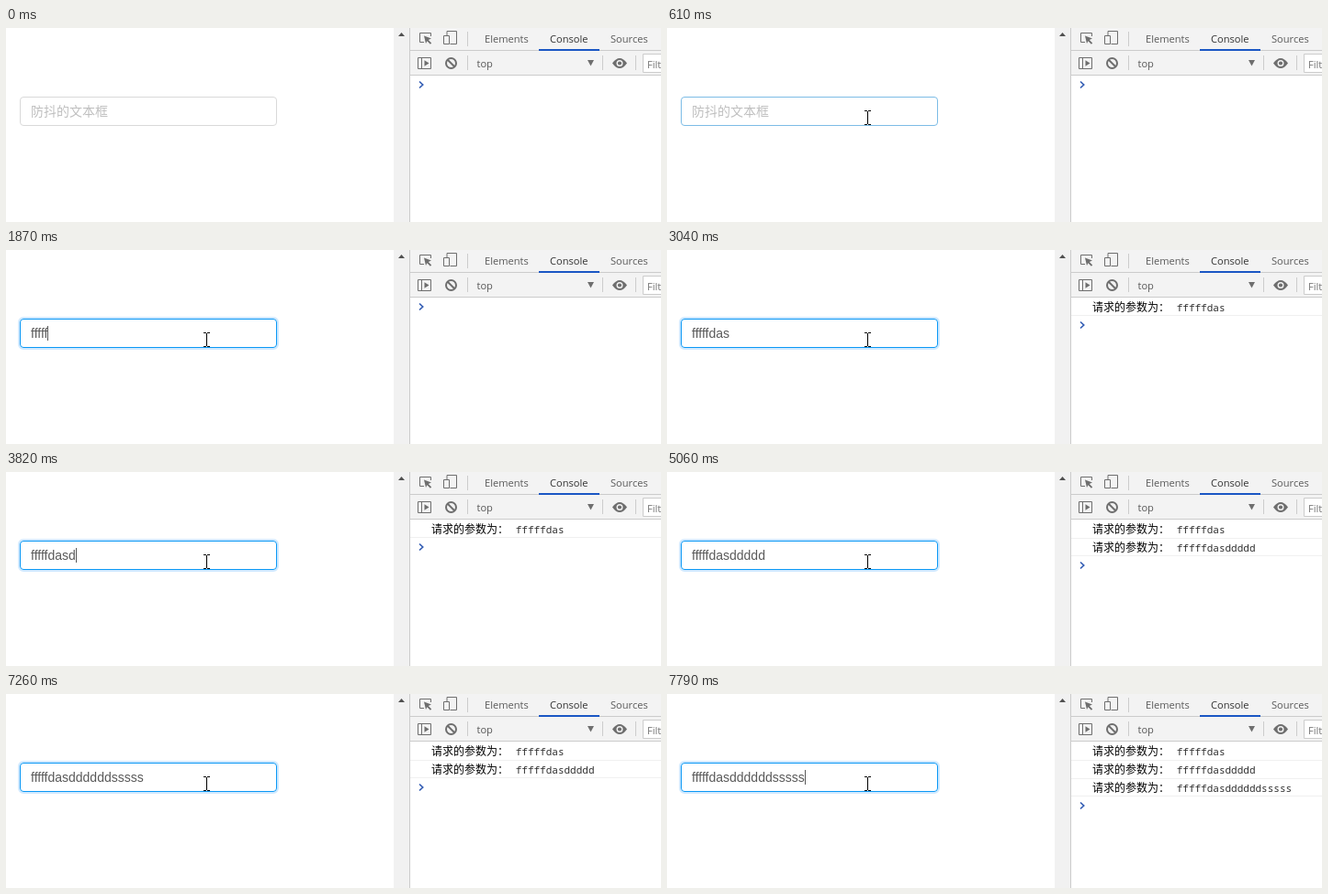
These frames come from a looping animation (713 px wide and 212 px high, 8 s). An HTML page:

```html
<!DOCTYPE html>
<html lang="zh-CN">
<head>
<meta charset="utf-8">
<style>
  html, body { margin: 0; width: 100%; height: 100%; overflow: hidden; background: #fff; }
  svg { display: block; }
  .tab { font: 11.1px "Open Sans", sans-serif; fill: #5a5a5a; }
  .tab .active { fill: #333; }
  .tab .faint { fill: #757575; }
  .cjk { font-family: "Noto Sans CJK SC", "Noto Sans CJK", sans-serif; }
  .mono { font: 11px "Noto Sans Mono", monospace; fill: #303030; }
  #typed { font: 14px "Liberation Sans", Arial, sans-serif; font-variant-ligatures: none; fill: #595959; }
  .icon { fill: none; stroke: #6e6e6e; }
  .solid { fill: #6e6e6e; }
</style>
</head>
<body>
<svg width="713" height="212" viewBox="0 0 713 212">
  <!-- page scrollbar -->
  <path d="M422 0h17v212h-17z" fill="#f1f1f1"/>
  <path d="M427 9l3.5-4 3.5 4z" fill="#505050"/>

  <!-- developer tools -->
  <path d="M440 0h273v52H440z" fill="#f3f3f3"/>
  <path d="M439.5 0V212M440 24.5H713M440 51.5H713M502.5 4V20M502.5 30V46M649.5 30V46M685.5 30V46"
        fill="none" stroke="#ccc"/>
  <path d="M580 23h66v2h-66z" fill="#1a56c4"/>
  <g class="icon">
    <path d="M455 15.5H450.5V5.5H462.5V9"/>
    <path d="M480 8V3.5H490.5V17.5H483.5M476.5 8.5H482.5V17.5H476.5z"/>
    <path d="M448.5 32.5H462.5V44.5H448.5zM452.5 32.5V44.5"/>
    <g stroke-width="2"><circle cx="484.5" cy="38.5" r="5.5"/><path d="M480.5 34.5l8 8"/></g>
  </g>
  <g class="solid">
    <path d="M455 8.5l8 3-3.2 1.4 3.4 3.6-1.3 1.2-3.5-3.5-1.4 2.8z"/>
    <path d="M455.5 35.2l5 3.3-5 3.3z"/>
    <path d="M633 35h7l-3.5 6.5z"/>
    <path d="M660 38.5q8-11 16 0q-8 11-16 0z"/>
  </g>
  <circle cx="668" cy="38.5" r="2.8" fill="#6e6e6e" stroke="#f3f3f3" stroke-width="1.4"/>
  <path d="M693.5 28.5H720V48.5H693.5z" fill="#fff" stroke="#ccc"/>
  <g class="tab">
    <text x="521" y="16">Elements</text>
    <text x="592" y="16" class="active">Console</text>
    <text x="658" y="16">Sources</text>
    <text x="512.5" y="43">top</text>
    <text x="698" y="44" class="faint">Filter</text>
  </g>
  <g id="logs"></g>
  <path id="lastLine" d="M440 51.5H713" stroke="#f0f0f0"/>
  <path id="prompt" d="M450 58.5l3.7 3.5-3.7 3.5" fill="none" stroke="#365fb5" stroke-width="1.7"/>

  <!-- text field -->
  <rect id="glow" x="14" y="74" width="282" height="34" rx="5" fill="none" stroke="#1890ff" stroke-width="2"/>
  <rect id="field" x="15.5" y="75.5" width="279" height="31" rx="3.5" fill="#fff"/>
  <text id="hint" class="cjk" x="27" y="96" font-size="14" fill="#bfbfbf">防抖的文本框</text>
  <text id="typed" x="27" y="96"></text>
  <rect id="caret" y="83" width="1" height="16" fill="#595959"/>

  <!-- pointer shapes, hot spot at 0,0 -->
  <path id="arrow" d="M0 0V16l3.7-3.5 2.5 5.8 2.4-1-2.5-5.7h5.2z" fill="#fff" stroke="#000"/>
  <path id="beam" d="M-3 -7.5H0M1 -7.5H4M.5 -7V7M-3 7.5H0M1 7.5H4" fill="none" stroke="#000"/>
</svg>
<script>
const LOOP = 8000;
const TEXT = "fffffdasddddddsssss";
const KEYS = [1150, 1330, 1510, 1690, 1870, 2170, 2490, 2490, 3820, 4050,
  4200, 4350, 4510, 5790, 5960, 6130, 6310, 6550, 6700];
const LOGS = [3040, 5060, 7330];
const CARET_OFF = [[3040, 3590], [5060, 5610], [7260, 7790]];
// quadratic curve of the pointer: start, control, end
const PATH = [[514, 200], [204, 205], [218, 98]];

const $ = id => document.getElementById(id);
const show = (id, on) => $(id).setAttribute("visibility", on ? "visible" : "hidden");
const shift = (id, x, y) => $(id).setAttribute("transform", `translate(${x} ${y})`);
const ramp = (t, a, b) => Math.min(1, Math.max(0, (t - a) / (b - a)));
const mix = (a, b, k) => a + (b - a) * k;
const typedAt = t => TEXT.slice(0, KEYS.filter(k => k <= t).length);

$("logs").innerHTML = LOGS.map((at, i) => `<g id="log${i}" transform="translate(0 ${i * 20})">
  ${i ? '<path d="M440 52.5H713" stroke="#f0f0f0"/>' : ""}
  <text class="cjk" x="463" y="67" font-size="12">请求的参数为：</text>
  <text class="mono" x="554.7" y="67">${typedAt(at)}</text></g>`).join("");

function drawPointer(t) {
  const k = 1 - (1 - ramp(t, 70, 600)) ** 2;
  const [x, y] = [0, 1].map(i => {
    const [a, b, c] = PATH.map(p => p[i]);
    return Math.round(mix(mix(a, b, k), mix(b, c, k), k));
  });
  const inField = x < 295 && y < 107;
  show("arrow", t >= 70 && !inField);
  show("beam", inField);
  shift("arrow", x, y);
  shift("beam", x, y);
}

function drawField(t) {
  const hover = ramp(t, 520, 720);
  const rgb = [10, 152, 245].map(c => Math.round(mix(217, c, hover)));
  $("field").setAttribute("stroke", `rgb(${rgb})`);
  $("glow").setAttribute("stroke-opacity", 0.2 * ramp(t, 800, 1000));

  const text = typedAt(t);
  if ($("typed").textContent !== text) $("typed").textContent = text;
  show("hint", !text);
  const width = text ? $("typed").getComputedTextLength() : 0;
  $("caret").setAttribute("x", Math.round(27 + width));
  show("caret", t >= 850 && !CARET_OFF.some(([a, b]) => t >= a && t < b));
}

function drawConsole(t) {
  LOGS.forEach((at, i) => show("log" + i, t >= at));
  const rows = LOGS.filter(at => at <= t).length;
  show("lastLine", rows > 0);
  shift("lastLine", 0, rows * 20);
  shift("prompt", 0, rows * 20);
}

let start;
function frame(now) {
  start ??= now;
  const t = (now - start) % LOOP;
  drawPointer(t);
  drawField(t);
  drawConsole(t);
  requestAnimationFrame(frame);
}
requestAnimationFrame(frame);
</script>
</body>
</html>
```
